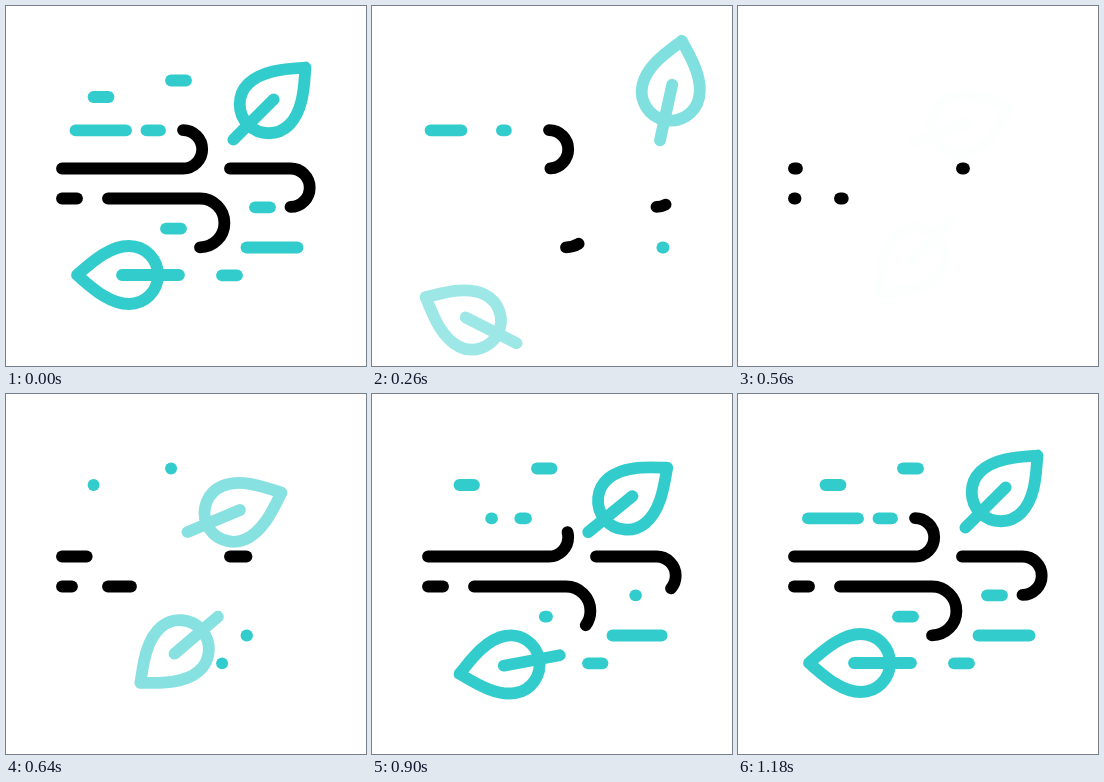
These frames come from a looping animation (360x360 px, 1200 ms). An HTML page:

```html
<!DOCTYPE html>
<html lang="en">
<head>
<meta charset="utf-8">
<title>Wind</title>
<style>
  html, body { margin: 0; height: 100%; overflow: hidden; background: #fff; }
  svg { display: block; width: 100%; height: 100%; }
  path { fill: none; stroke-width: 11.8; stroke-linecap: round; stroke-linejoin: round; }
</style>
</head>
<body>
<svg id="stage" viewBox="0 0 360 360"></svg>
<script>
const LOOP = 1200, TEAL = '#33cccc', BLACK = '#000';
const stage = document.getElementById('stage');

// hold: share of the path covered at rest; retract: leave towards the path's start
const streaks = [
  { d: 'M56 162.5H177a19.2 19.2 0 0 0 0-38.4', color: BLACK, enter: [520, 1023], exit: [0, 425] },
  { d: 'M102 192.5H194a24.4 24.4 0 0 1 0 48.8', color: BLACK, enter: [520, 1023], exit: [0, 320] },
  { d: 'M224 162.5H284.5a19.2 19.2 0 0 1 0 38.4', color: BLACK, enter: [520, 1023], exit: [0, 320] },
  { d: 'M56 192.5H71', color: BLACK, enter: [520, 720], exit: [0, 140] },
  { d: 'M165 74.5H180', enter: [620, 940], exit: [0, 184], retract: true },
  { d: 'M87.5 91H102.5', enter: [620, 940], exit: [0, 150], retract: true },
  { d: 'M216 269.3H231', enter: [620, 940], exit: [0, 200], retract: true },
  { d: 'M240.5 241.5H291.5', enter: [620, 940], exit: [0, 288] },
  { d: 'M120 124.4H41.5', enter: [875, 1200], exit: [115, 455], hold: 0.643 },
  { d: 'M154 124.4H125.5', enter: [820, 1000], exit: [115, 345], hold: 0.474 },
  { d: 'M264 201.3H249', enter: [860, 1155], exit: [0, 220] },
  { d: 'M175 222.7H160', enter: [840, 1085], exit: [0, 227] }
];

// Each leaf drifts in along a curve while turning, then swings out around a pivot
const leaves = [
  { tip: [299.5, 61.5], axis: 135, center: [264, 97],
    enter: { angle: 25, drift: [-30.7, 41], bend: [-9.5, -19.5] },
    exit: { angle: -42, pivot: [259, 30.5], time: [0, 380], fade: [200, 360] } },
  { tip: [71, 269], axis: 0, center: [122, 269],
    enter: { angle: -45.5, drift: [71, 14.5], bend: [-15.2, -33] },
    exit: { angle: 28, pivot: [16, 243.5], time: [0, 300], fade: [185, 330] } }
];
const LEAF = 'M0 0C10-8 30-29 52-29A29 29 0 0 1 52 29C30 29 10 8 0 0ZM45 0H102';
const LEAF_ENTER = [520, 1080], LEAF_FADE_IN = [560, 700], HALF = 520;

const linear = (t, [from, to]) => Math.min(1, Math.max(0, (t - from) / (to - from)));
const ease = (t, span) => (1 - Math.cos(Math.PI * linear(t, span))) / 2;

function addPath(d, color) {
  const path = document.createElementNS('http://www.w3.org/2000/svg', 'path');
  path.setAttribute('d', d);
  path.setAttribute('stroke', color);
  return stage.appendChild(path);
}

for (const s of streaks) {
  s.path = addPath(s.d, s.color || TEAL);
  s.length = s.path.getTotalLength();
}
for (const leaf of leaves) leaf.path = addPath(LEAF, TEAL);

function drawStreak({ path, length, enter, exit, hold = 1, retract }, t) {
  let start = 0, end;
  if (t >= HALF) {
    end = hold * ease(t, enter);
  } else {
    const p = ease(t, exit);
    if (retract) {
      end = 1 - p;
    } else {
      start = p;
      end = hold + (1 - hold) * p;
    }
  }
  const visible = (end - start) * length;
  path.style.visibility = visible > 0.02 ? 'visible' : 'hidden';
  path.setAttribute('stroke-dasharray', `${Math.max(visible, 0.02)} 999`);
  path.setAttribute('stroke-dashoffset', -start * length);
}

function drawLeaf({ path, tip, axis, center, enter, exit }, t) {
  let move, opacity;
  if (t >= HALF) {
    const left = 1 - ease(t, LEAF_ENTER);
    const shift = enter.drift.map((v, i) => left * (v + left * enter.bend[i]));
    move = `translate(${shift}) rotate(${enter.angle * left} ${center})`;
    opacity = linear(t, LEAF_FADE_IN);
  } else {
    move = `rotate(${exit.angle * ease(t, exit.time)} ${exit.pivot})`;
    opacity = 1 - linear(t, exit.fade);
  }
  path.setAttribute('transform', `${move} translate(${tip}) rotate(${axis})`);
  path.setAttribute('opacity', opacity);
}

function frame() {
  const t = performance.now() % LOOP;
  for (const s of streaks) drawStreak(s, t);
  for (const leaf of leaves) drawLeaf(leaf, t);
  requestAnimationFrame(frame);
}
frame();
</script>
</body>
</html>
```
